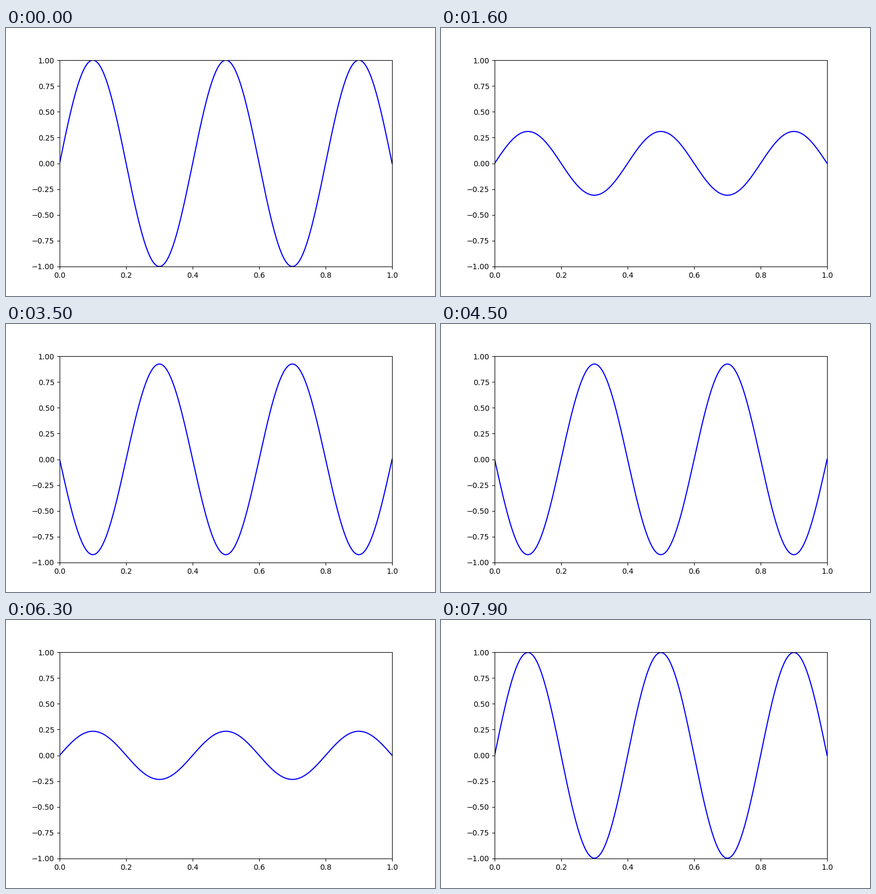
A matplotlib script that plays this animation: 800 px wide and 500 px high, repeating every 8 s.

```python
import numpy as np
import matplotlib.pyplot as plt
from matplotlib.animation import FuncAnimation

FRAMES = 80
INTERVAL = 100  # ms
WAVES = 2.5

fig, ax = plt.subplots(figsize=(8, 5), dpi=100)
ax.set_xlim(0, 1)
ax.set_ylim(-1, 1)

x = np.linspace(0, 1, 1000)
shape = np.sin(2 * np.pi * WAVES * x)
line, = ax.plot(x, shape, color="blue", lw=1.5)


def update(i):
    """Standing wave: the amplitude swings through one full cosine per loop."""
    line.set_ydata(np.cos(2 * np.pi * i / FRAMES) * shape)
    return line,


anim = FuncAnimation(fig, update, frames=FRAMES, interval=INTERVAL,
                     repeat=True, repeat_delay=0, blit=False)
plt.show()
```
